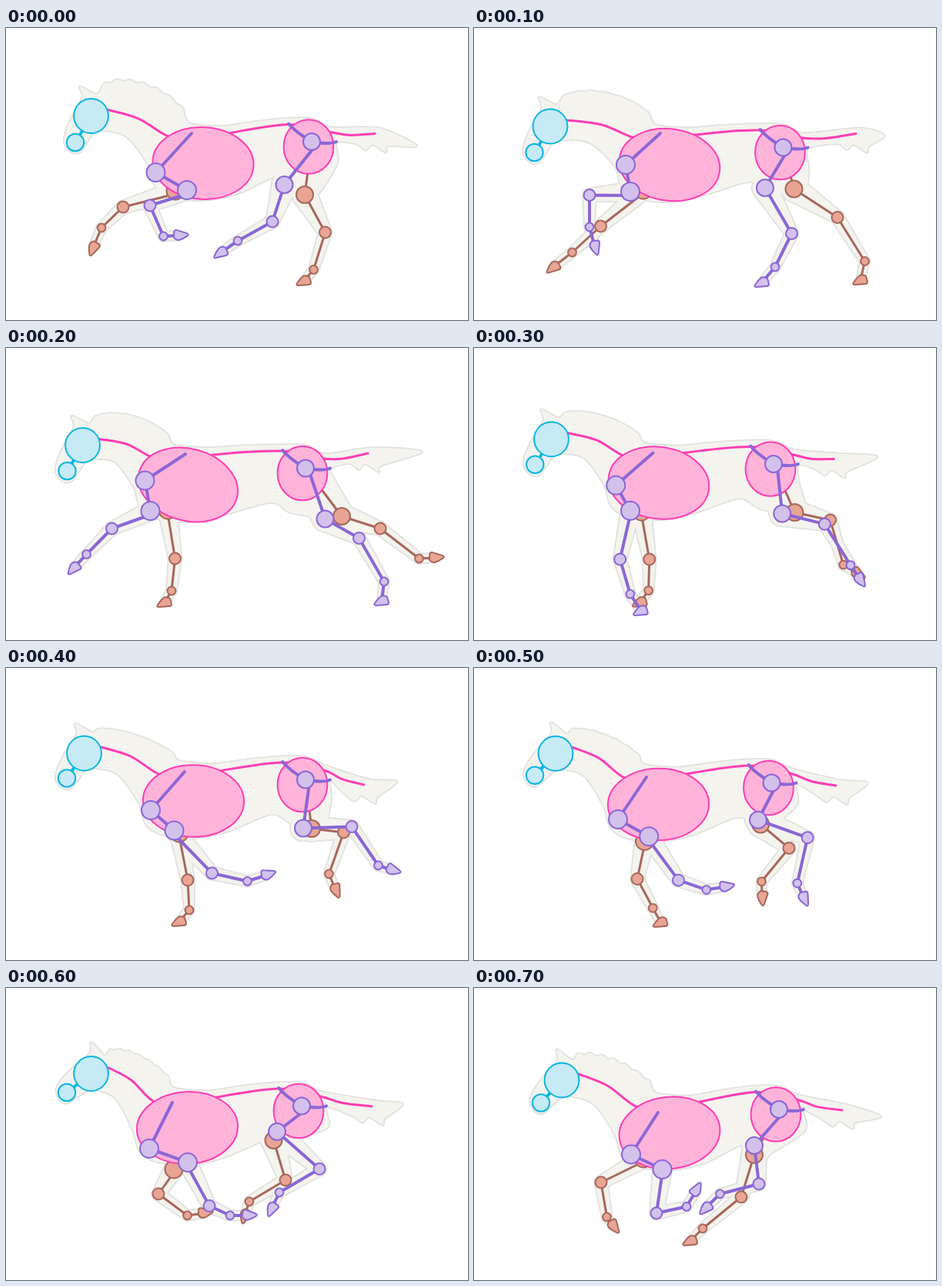
Recreate the animation shown at these times as an HTML page. Size 600 px wide and 380 px high, loop 0.8 s.

```html
<!DOCTYPE html>
<html lang="en">
<head>
<meta charset="utf-8">
<title>Galloping horse</title>
<style>
html, body { margin: 0; width: 100%; height: 100%; overflow: hidden; background: #fff; }
svg { display: block; width: 600px; height: 380px; }
.pose { opacity: 0; animation: show 800ms step-end infinite; }
@keyframes show { 0% { opacity: 1; } 12.5%, 100% { opacity: 0; } }
path, circle, ellipse { stroke-linejoin: round; stroke-linecap: round; stroke-width: 2; }
.rim * { fill: none; stroke: #e1e1de; stroke-width: 3.6; }
.skin * { fill: #f4f3ee; stroke: none; }
.far { stroke: #a8675c; fill: #e8a593; }
.near { stroke: #8a66d6; fill: #d3c1ec; }
.trunk { stroke: #ff3db5; fill: #ffb3d9; }
.head { stroke: #06b6e0; fill: #c6eaf6; }
path.bone { fill: none; stroke-width: 4; }
.far path.bone, .trunk path.bone { stroke-width: 3; }
</style>
</head>
<body>
<svg id="stage" viewBox="0 0 600 380"></svg>
<script>
// Key points of each pose; everything else is derived from them.
// tail: end of the spine, tip of the hair. mane: height, ruffle.
// legs (near fore, far fore, near hind, far hind): upper joint, middle joint, fetlock, hoof.
const poses = [];
poses[0] = {
  rib: [256, 176], tilt: 3, pelvis: [393, 154.5], skull: [110.5, 114.5], muzzle: [90, 149],
  blade: [241, 137], shoulder: [194.5, 188], tail: [479, 137.5, 533, 153], mane: [31, 3],
  legs: [[235, 211, 187, 231, 204.5, 271, 226, 270], [220, 212, 152, 233, 124, 260, 113, 286],
    [361.5, 204, 346, 252, 301, 277, 279, 292], [388, 217, 414.5, 266, 399.5, 314.5, 387, 329]]
};
poses[1] = {
  rib: [254, 178], tilt: 8, pelvis: [397.5, 162], skull: [99, 128], muzzle: [78.5, 162],
  blade: [242, 137], shoulder: [197, 178], tail: [496, 137.5, 533, 140], mane: [28, 1],
  legs: [[203, 213, 150, 217.5, 150, 259, 157, 285], [220, 211, 164.5, 258, 127.5, 292, 103, 311],
    [378, 208, 412.5, 267.5, 391, 311, 374, 331], [415.5, 209.5, 472, 246.5, 507.5, 303.5, 502, 328]]
};
poses[2] = {
  rib: [236.5, 178], tilt: 15, pelvis: [385, 163], skull: [99.5, 126.5], muzzle: [79.5, 160],
  blade: [233, 138], shoulder: [180.5, 172.5], tail: [470, 137, 540, 135], mane: [24, 0],
  legs: [[187.5, 212, 137.5, 235, 104.5, 268.5, 88, 286], [210, 211, 219.5, 274, 215, 316, 206, 331],
    [414.5, 222.5, 458.5, 247.5, 491, 304, 488, 329], [436, 219, 486, 235, 536.5, 274, 558, 273]]
};
poses[4] = {
  rib: [243.5, 173], tilt: 1, pelvis: [385, 152], skull: [101.5, 111], muzzle: [79, 143.5],
  blade: [232, 135], shoulder: [188, 185], tail: [465, 152, 507, 148], mane: [15, 0],
  legs: [[218.5, 211.5, 267.5, 267, 313.5, 277.5, 340, 269], [225, 215, 236, 276, 238, 315, 225, 330],
    [386, 208.5, 449, 206.5, 483.5, 257, 502, 263], [397, 209, 438.5, 214, 419.5, 268, 428, 289]]
};
poses[6] = {
  rib: [235.5, 182], tilt: -3, pelvis: [380, 160], skull: [110.5, 111.5], muzzle: [79, 136],
  blade: [216, 149], shoulder: [186, 209], tail: [475, 154, 515, 151], mane: [20, 2],
  legs: [[236, 227, 264, 283.5, 291, 296, 315, 296], [218, 236, 198, 268, 235.5, 296, 258, 293],
    [352, 187, 407, 235.5, 355, 266, 345, 287], [347.5, 198, 363, 250, 316, 278, 310, 296]]
};
poses[7] = {
  rib: [254, 188.5], tilt: -6, pelvis: [392, 164.5], skull: [114, 120], muzzle: [87, 149.5],
  blade: [239, 162], shoulder: [204, 216.5], tail: [478, 159, 528, 167], mane: [20, 3],
  legs: [[244.5, 236, 237, 293, 276, 284.5, 289, 263], [220, 222, 165, 253, 172.5, 298, 181, 310],
    [364, 205, 370, 255, 319.5, 268, 301, 286], [364, 217, 347, 272, 297, 313, 281, 329]]
};

const pairs = a => a.flatMap((v, i) => i % 2 ? [] : [[v, a[i + 1]]]);
const mean = (a, b) => Array.isArray(a) ? a.map((v, i) => mean(v, b[i])) : (a + b) / 2;
const add = ([x, y], dx, dy) => [x + dx, y + dy];
const mix = (a, b, t) => a.map((v, i) => v + (b[i] - v) * t);
const heading = ([x, y], [u, v]) => Math.atan2(v - y, u - x);
const dist = ([x, y], [u, v]) => Math.hypot(u - x, v - y);

// Swing each bone halfway, the short way round
function swing(a, b) {
  const p = pairs(a), q = pairs(b), out = [mean(p[0], q[0])];
  for (let i = 0; i < 3; i++) {
    const from = heading(p[i], p[i + 1]), turn = heading(q[i], q[i + 1]) - from;
    const t = from + Math.atan2(Math.sin(turn), Math.cos(turn)) / 2;
    const len = mean(dist(p[i], p[i + 1]), dist(q[i], q[i + 1]));
    out.push(add(out[i], len * Math.cos(t), len * Math.sin(t)));
  }
  return out.flat();
}
function between(a, b) {
  const p = {};
  for (const k in a) p[k] = mean(a[k], b[k]);
  p.legs = a.legs.map((leg, i) => swing(leg, b.legs[i]));
  return p;
}
poses[3] = between(poses[2], poses[4]);
poses[5] = between(poses[4], poses[6]);

// Catmull-Rom curve through points
function smooth(p, closed, k = 6) {
  const n = p.length;
  const at = i => closed ? p[(i + n) % n] : p[Math.max(0, Math.min(n - 1, i))];
  let d = 'M' + p[0];
  for (let i = 0; i < (closed ? n : n - 1); i++) {
    const [a, b, c, e] = [at(i - 1), at(i), at(i + 1), at(i + 2)];
    const ctrl = [0, 1].map(j => b[j] + (c[j] - a[j]) / k)
      .concat([0, 1].map(j => c[j] - (e[j] - b[j]) / k));
    d += 'C' + [...ctrl, ...c].map(v => v.toFixed(1)).join(' ');
  }
  return d + (closed ? 'Z' : '');
}

function outline(p) {
  const rib = (x, y) => add(p.rib, x, y), pel = (x, y) => add(p.pelvis, x, y);
  const end = (x, y) => add(p.tail, x, y);
  const nod = heading(p.skull, p.muzzle) - 2.11, c = Math.cos(nod), s = Math.sin(nod);
  const head = (x, y) => add(p.skull, x * c - y * s, x * s + y * c);
  const poll = head(8, -28), withers = rib(-18, -52), back = rib(25, -48), croup = pel(-25, -37);
  const throat = head(8, 19), breast = rib(-71, 2);
  const [height, ruffle] = p.mane, crest = [];
  for (let i = 1; i < 14; i++) {
    const t = i / 14, lift = height * (4 * t * (1 - t)) ** 0.6;
    crest.push(add(mix(poll, withers, t), 0, -lift - (i % 2 ? ruffle : 0)));
  }
  return [
    head(-15, 47), head(-25, 47), head(-34, 37), head(-34, 25), head(-26, 4), head(-11, -24), head(-14, -38),
    poll, ...crest, withers,
    back, add(mix(back, croup, 0.5), 0, -1), croup, pel(5, -36), pel(30, -25),
    end(6, -7), p.tail.slice(2), end(17, 16), end(14, 24), end(-3, 14), end(-12, 21), end(-24, 13),
    pel(36, -5), pel(37, 22), add(p.legs[3], 13, 3), pel(-12, 52), pel(-40, 38),
    rib(46, 39), rib(0, 48), rib(-40, 44), rib(-62, 30), breast,
    add(mix(throat, breast, 0.5), 4, -15), throat, head(-6, 35)
  ];
}

function spine(p) {
  const nape = add(p.skull, 22, -8), chest = add(p.rib, -43, -34);
  const dock = add(p.pelvis, 28, -19), end = p.tail.slice(0, 2);
  return [nape, add(mix(nape, chest, 0.5), 0, -6), chest, add(p.rib, -5, -30), add(p.rib, 33, -39),
    add(p.pelvis, -26, -29), dock, add(mix(dock, end, 0.45), 0, 3), end];
}

const path = (d, cls = '') => `<path class="${cls}" d="${d}"/>`;
const bone = (...pts) => path('M' + pts.join(' '), 'bone');
const disc = ([x, y], r) => `<circle cx="${x}" cy="${y}" r="${r}"/>`;
const oval = ([x, y], rx, ry, tilt = 0) =>
  `<ellipse cx="${x}" cy="${y}" rx="${rx}" ry="${ry}" transform="rotate(${tilt} ${x} ${y})"/>`;
const group = (cls, ...parts) => `<g class="${cls}">${parts.join('')}</g>`;

// Tapered flesh around one bone
function taper(a, b, r, s) {
  const t = heading(a, b), nx = -Math.sin(t), ny = Math.cos(t);
  return path(`M${add(a, nx * r, ny * r)}A${r} ${r} 0 0 1 ${add(a, -nx * r, -ny * r)}` +
    `L${add(b, -nx * s, -ny * s)}A${s} ${s} 0 0 1 ${add(b, nx * s, ny * s)}Z`);
}
function flesh(leg, i, hip) {
  const p = pairs(leg), fore = i < 2, r = [fore ? 12 : 16, 8, 6, 5];
  let out = fore ? '' : taper(hip, p[0], 25, r[0]);
  for (let j = 0; j < 3; j++) out += taper(p[j], p[j + 1], r[j], r[j + 1]);
  return out;
}

// A hoof lies flat on the ground, otherwise it follows the pastern
function hoof(fetlock, foot) {
  const turn = foot[1] > 325 ? 0 : heading(fetlock, foot) * 180 / Math.PI - 155;
  return `<path transform="translate(${foot}) rotate(${turn})" d="M-9 3Q-5-3-1-6Q3-8 7-5L9 2Q9 5 6 5L-7 6Q-11 6-9 3Z"/>`;
}
function limb(leg, start, r, drop) {
  const [top, mid, fetlock, foot] = pairs(leg);
  return (start ? bone(start, top) : '') + bone(add(top, 0, drop), mid, fetlock, foot) +
    disc(top, r) + disc(mid, 7.5) + disc(fetlock, 5.4) + hoof(fetlock, foot);
}

function draw(p, i) {
  const [nf, ff, nh, fh] = p.legs;
  const hip = add(p.pelvis, 4, -6.5), femur = add(hip, 5, 5);
  const ilium = add(p.pelvis, -26, -30), seat = add(p.pelvis, 36, -6.5);
  const shape = path(smooth(outline(p), true, 7)) + p.legs.map((l, j) => flesh(l, j, hip)).join('');
  const girdle = path(`M${ilium}Q${add(ilium, 9, 11)} ${hip}Q${add(seat, -9, 4)} ${seat}`, 'bone');
  const g = group('pose',
    group('rim', shape),
    group('skin', shape),
    group('far', limb(ff, null, 11.5, 4), limb(fh, hip, 11, 0)),
    group('trunk', path(smooth(spine(p)), 'bone'),
      oval(p.rib, 65.6, 46.8, p.tilt), oval(p.pelvis, 32.4, 35.3)),
    group('near', girdle, limb(nh, femur, 11, 0), disc(hip, 11),
      bone(p.blade, p.shoulder), limb(nf, p.shoulder, 12, 5), disc(p.shoulder, 12)),
    group('head', bone(p.skull, p.muzzle), disc(p.skull, 22.4), disc(p.muzzle, 11.2)));
  return g.replace('<g', `<g style="animation-delay:${(i - 8) * 100}ms"`);
}

document.getElementById('stage').innerHTML = poses.map(draw).join('');
</script>
</body>
</html>
```
